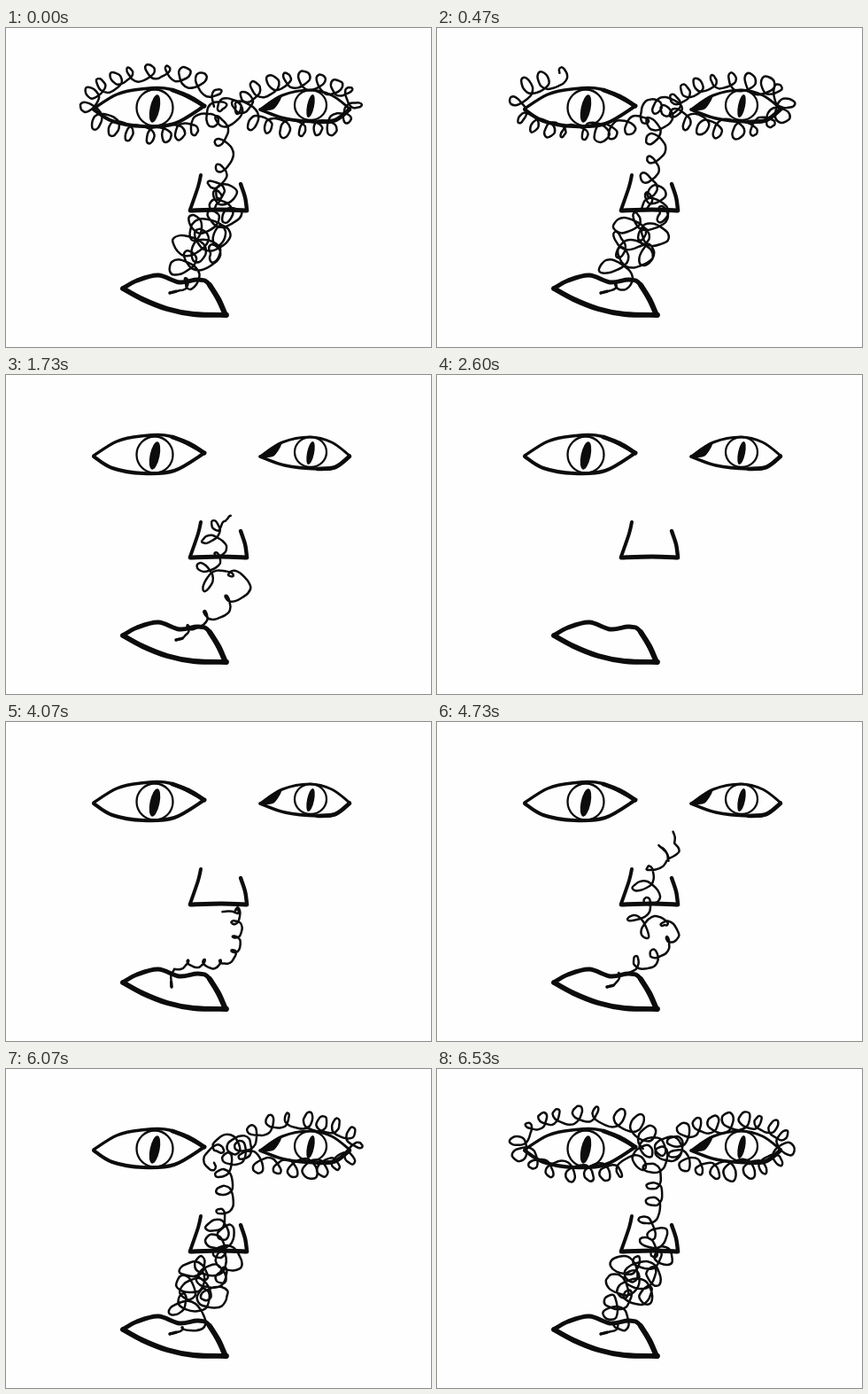
These frames come from a looping animation (480x360 px, 6.59 s). An HTML page with a canvas:

```html
<!DOCTYPE html>
<html lang="en">
<head>
<meta charset="utf-8">
<title>Scribble face</title>
<style>
html, body { margin: 0; width: 100%; height: 100%; overflow: hidden; background: #fefefe; }
canvas { display: block; width: 480px; height: 360px; }
</style>
</head>
<body>
<canvas id="stage" width="480" height="360"></canvas>
<script>
const ctx = document.getElementById('stage').getContext('2d');
const LOOP = 6590;
const PAPER = '#fefefe';
const INK = '#0c0c0c';
const TAU = Math.PI * 2;
const TURN = 10; // pen points per curl

// Zigzag rows climbing from (x0, y0) to (x1, y1)
function weave(x0, y0, x1, y1, half, rows) {
  return Array.from({ length: rows }, (_, i) => {
    const p = i / (rows - 1);
    return [x0 + (x1 - x0) * p + (i % 2 ? half : -half), y0 + (y1 - y0) * p];
  });
}

// Closed oval route, clockwise from the given angle
function oval(cx, cy, rx, ry, start) {
  return Array.from({ length: 37 }, (_, i) => {
    const a = start + TAU * i / 36;
    return [cx + rx * Math.cos(a), cy + ry * Math.sin(a)];
  });
}

// A stage is [route, curl radius, gap between curls]
const hook = [[185, 299], [201, 295], [212, 284]];
const chin = [
  [[[187, 299], [186, 284], [200, 275], [247, 271], [258, 262], [261, 216]], 5, 18],
  [[[265, 212], [258, 215], [243, 215]], 2, 24]
];
const nose = [
  [[[192, 299], [200, 297], [214, 277], [246, 265], [268, 241], [258, 221], [228, 238], [224, 216],
    [240, 208], [245, 195], [228, 186], [246, 166]], 8, 25],
  [[[263, 157], [252, 138], [264, 156], [274, 148], [267, 124]], 1.5, 24]
];
const bridge = [
  [[[188, 297], [193, 288], [205, 281], ...weave(220, 270, 236, 213, 14, 6)], 9, 21],
  [[...weave(245, 194, 246, 168, 10, 4), [246, 152]], 8, 19],
  [[[270, 137], [254, 127], [268, 100], [288, 76], [313, 58], [350, 54]], 6, 24]
];
const full = [
  [[...hook, [200, 275], ...weave(215, 266, 235, 214, 24, 6)], 11, 24],
  [[...weave(242, 196, 243, 178, 10, 3), [245, 158], [247, 138], [244, 110]], 9, 20],
  [oval(332, 87, 63, 28, Math.PI), 9.5, 19],
  [oval(166, 85, 74, 34, 0), 9.5, 19]
];

// [first step, last step, stages, reach at first, reach at last, easing power]
const scenes = [
  [0, 15, full, 4, 2.1, 2.5],
  [16, 38, nose, 2, 0.1, 1],
  [47, 61, chin, 0.1, 2, 0.7],
  [62, 71, nose, 0.6, 2, 1],
  [72, 83, bridge, 2.1, 3, 1],
  [84, 98, full, 2.3, 4, 1]
];

function hash(n, seed) {
  const s = Math.sin(n * 127.1 + seed * 311.7) * 43758.5453;
  return (s - Math.floor(s)) * 2 - 1;
}

function noise(u, seed) {
  const i = Math.floor(u), f = u - i;
  return hash(i, seed) + (hash(i + 1, seed) - hash(i, seed)) * f * f * (3 - 2 * f);
}

const startOf = step => 10 * Math.round(step * 20 / 3);

function stepAt(t) {
  let k = 0;
  while (k < 98 && startOf(k + 1) <= t) k++;
  return k;
}

const gapTo = (a, b) => Math.hypot(b[0] - a[0], b[1] - a[1]);

function lengthOf(line) {
  return line.slice(1).reduce((sum, p, i) => sum + gapTo(line[i], p), 0);
}

function along(line, d) {
  for (let i = 1; i < line.length; i++) {
    const [a, b] = [line[i - 1], line[i]], len = gapTo(a, b);
    if (d <= len && len) return [a[0] + (b[0] - a[0]) * d / len, a[1] + (b[1] - a[1]) * d / len];
    d -= len;
  }
  return line[line.length - 1];
}

// The pen circles a centre that travels along the stages' routes
function trace(stages, reach, seed) {
  const pts = [];
  let end = null, phase = Math.PI, travelled = 0;
  stages.forEach(([route, radius, gap], s) => {
    const line = end ? [end, ...route] : route;
    const total = lengthOf(line);
    for (let d = 0; d < total && s + d / total <= reach; d += gap / TURN) {
      const u = phase / TAU;
      const ramp = Math.min(1, Math.max(0, (travelled - 12) / 20));
      const r = ramp * radius * (1 + 0.25 * noise(u, seed) + 0.1 * Math.sin(3 * phase + seed));
      const [x, y] = along(line, d);
      pts.push([x + r * Math.cos(phase) + ramp * 2.5 * noise(u, seed + 40),
        y - r * Math.sin(phase) + ramp * 2.5 * noise(u, seed + 80)]);
      phase += TAU / TURN * (1 + 0.3 * noise(u, seed + 120));
      travelled += gap / TURN;
    }
    end = line[line.length - 1];
  });
  return pts;
}

function spline(pts, width, fill) {
  if (pts.length < 2) return;
  ctx.beginPath();
  ctx.moveTo(pts[0][0], pts[0][1]);
  for (let i = 0; i < pts.length - 1; i++) {
    const a = pts[i - 1] || pts[i], b = pts[i], c = pts[i + 1], d = pts[i + 2] || c;
    ctx.bezierCurveTo(b[0] + (c[0] - a[0]) / 6, b[1] + (c[1] - a[1]) / 6,
      c[0] - (d[0] - b[0]) / 6, c[1] - (d[1] - b[1]) / 6, c[0], c[1]);
  }
  if (fill) ctx.fill();
  ctx.lineWidth = width;
  ctx.stroke();
}

function drawScribble(step) {
  const scene = scenes.find(s => step >= s[0] && step <= s[1]);
  if (!scene) return;
  const [first, last, stages, from, to, power] = scene;
  const p = Math.pow((step - first) / (last - first), power);
  const pts = trace(stages, from + (to - from) * p, step + 1);
  spline(pts, 2.5);
  spline(pts.slice(0, 4), 3.4);
}

// Slanted slit inside a round iris
function iris(x, y, rx, ry, slit) {
  ctx.beginPath();
  ctx.ellipse(x, y, rx, ry, 0, 0, TAU);
  ctx.lineWidth = 2.3;
  ctx.stroke();
  ctx.beginPath();
  ctx.ellipse(x, y + 1, slit, ry * 0.78, 0.2, 0, TAU);
  ctx.fill();
}

function drawFace() {
  // left eye
  spline([[99, 91], [125, 75], [152, 69], [185, 69], [224, 88]], 3.4);
  spline([[188, 70], [206, 77], [224, 88]], 5);
  spline([[99, 92], [120, 105], [155, 111], [190, 108], [224, 88]], 4);
  iris(168, 90, 20.5, 20.5, 5.5);

  // right eye
  spline([[287, 92], [312, 76], [343, 70], [368, 76], [388, 91]], 3);
  spline([[289, 92], [310, 77], [302, 91], [289, 92]], 1.5, true);
  spline([[287, 92], [315, 102], [352, 106], [372, 104], [388, 91]], 3.6);
  spline([[352, 106], [372, 104], [388, 92]], 4.6);
  iris(344, 87, 18, 17, 4);

  // nose
  spline([[220, 166], [217, 179], [208, 205]], 4);
  spline([[208, 206], [243, 205], [272, 206]], 4.8);
  spline([[272, 205], [270, 191], [265, 176]], 4.4);

  // mouth
  spline([[132, 294], [148, 285], [172, 279], [196, 287], [217, 284], [230, 290], [248, 323]], 5);
  spline([[230, 290], [240, 306], [247, 322]], 6);
  spline([[132, 294], [154, 306], [182, 317], [212, 323], [249, 324]], 5.8);
}

function draw(t) {
  ctx.fillStyle = PAPER;
  ctx.fillRect(0, 0, 480, 360);
  ctx.fillStyle = ctx.strokeStyle = INK;
  ctx.lineCap = ctx.lineJoin = 'round';
  drawFace();
  drawScribble(stepAt(t));
}

const begin = performance.now();
function tick() {
  draw((performance.now() - begin) % LOOP);
  requestAnimationFrame(tick);
}
tick();
</script>
</body>
</html>
```
